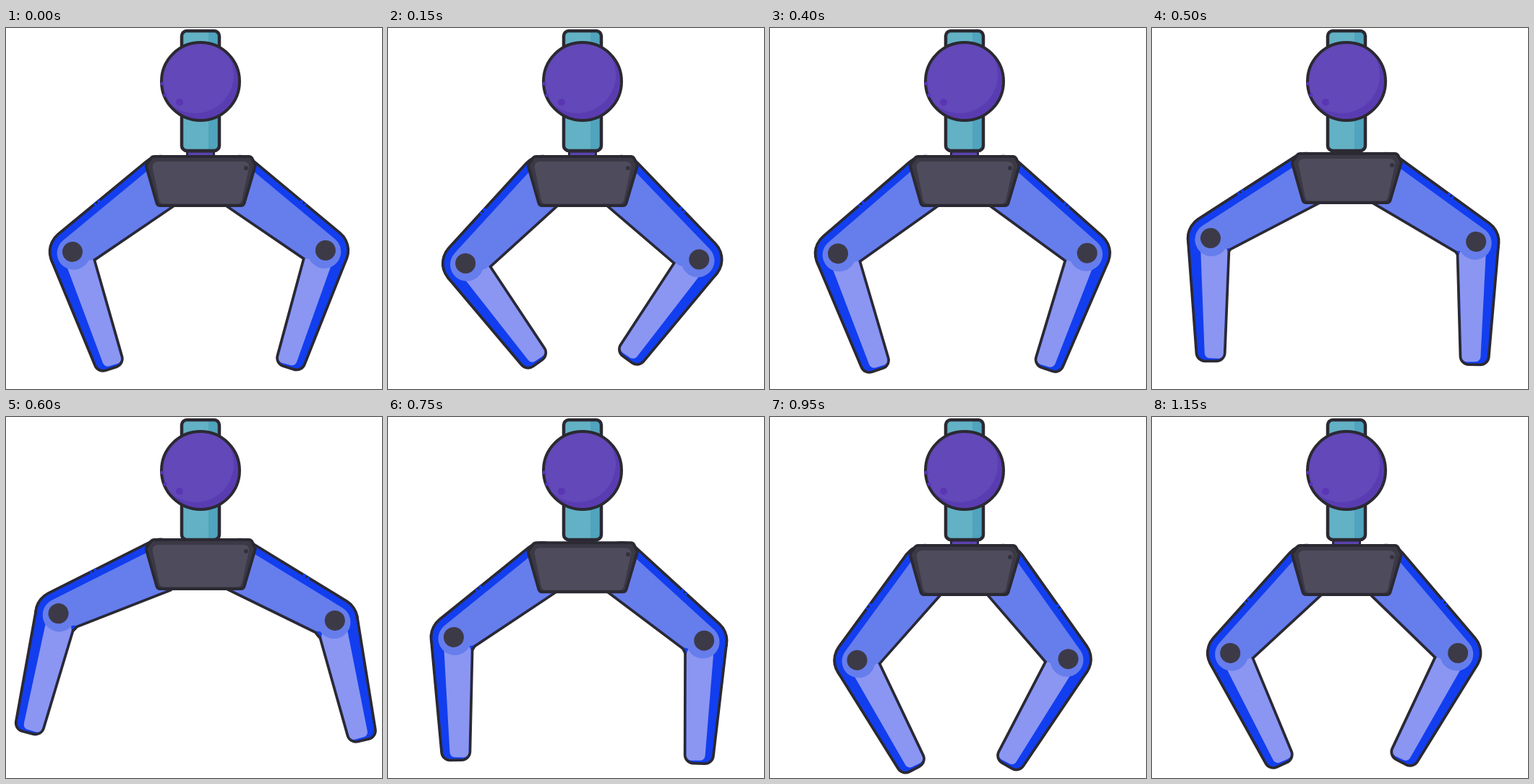
Animation, 520 px wide and 500 px high, one loop 1200 ms. Source, as an HTML page with a canvas:

```html
<!DOCTYPE html>
<html lang="en">
<head>
<meta charset="utf-8">
<title>Robot claw</title>
<style>
html, body { margin: 0; width: 100%; height: 100%; overflow: hidden; background: #fff; }
canvas { display: block; }
</style>
</head>
<body>
<canvas id="stage" width="520" height="500"></canvas>
<script>
const ctx = document.getElementById('stage').getContext('2d');
const LOOP = 1200, STEP = 50, RAD = Math.PI / 180;
const INK = '#2b2932', BLUE = '#123eef', ARM = '#667dec', LEG = '#8b96f2', JOINT = '#3d3a47';
const EDGE = 7.5;

// Key poses of the left arm: step, arm angle below horizontal, leg angle from vertical.
const keys = [
  [0, 39.6, 18.2], [6, 47, 33.7], [10, 32.9, 0], [12, 26.7, -14.4],
  [15, 39, 1], [19, 53.8, 27.7], [23, 48.1, 24.8]
];

// Slope at a key; the loop ends with a cut, so the ends are one-sided.
function slope(i, k) {
  const rate = j => (keys[j + 1][k] - keys[j][k]) / (keys[j + 1][0] - keys[j][0]);
  const last = keys.length - 1;
  if (i === 0) return 2 * rate(0) - slope(1, k);
  if (i === last) return 2 * rate(last - 1) - slope(last - 1, k);
  const before = keys[i][0] - keys[i - 1][0], after = keys[i + 1][0] - keys[i][0];
  return (after * rate(i - 1) + before * rate(i)) / (before + after);
}

function angle(k, t) {
  const next = keys.findIndex(key => key[0] > t);
  const i = (next < 0 ? keys.length - 1 : next) - 1;
  const a = keys[i], b = keys[i + 1], h = b[0] - a[0];
  const s = (t - a[0]) / h, r = 1 - s;
  return a[k] * r * r * (1 + 2 * s) + b[k] * s * s * (3 - 2 * s) +
    h * s * r * (slope(i, k) * r - slope(i + 1, k) * s);
}

function poly(points, radius) {
  const p = new Path2D(), n = points.length, [a, b] = [points[n - 1], points[0]];
  p.moveTo((a[0] + b[0]) / 2, (a[1] + b[1]) / 2);
  points.forEach((q, i) => p.arcTo(...q, ...points[(i + 1) % n], radius));
  p.closePath();
  return p;
}

function disc(x, y, r) {
  const p = new Path2D();
  p.arc(x, y, r, 0, 2 * Math.PI);
  return p;
}

function fill(path, color) {
  ctx.fillStyle = color;
  ctx.fill(path);
}

function outline(path, width) {
  ctx.strokeStyle = INK;
  ctx.lineWidth = width;
  ctx.lineJoin = 'round';
  ctx.stroke(path);
}

// Arm along +x from shoulder to elbow, outer side at +y.
function armPath(len, top, capY, capR) {
  const p = new Path2D();
  p.moveTo(5, -39);
  p.lineTo(len - 14, -26);
  p.arc(len, capY, capR, -2, Math.PI / 2);
  p.lineTo(0, top);
  p.arc(0, 0, top, Math.PI / 2, Math.PI);
  p.closePath();
  return p;
}

const legPath = poly([[-12, 22], [0, 29.5], [168.5, 17], [168.5, -17.5], [18, -23.5], [-12, -15]], 10);
const legPanel = poly([[10, 14], [166, 8], [167, -17.5], [18, -23.5], [10, -20]], 7);

function drawArm(len, arm, leg, lift) {
  const c = Math.cos(arm * RAD), s = Math.sin(arm * RAD);
  const upper = armPath(len, 29.5, 0, 29.5);
  const onLeg = draw => {
    ctx.save();
    ctx.translate(len, 0);
    ctx.rotate((arm - leg - 90) * RAD);
    draw();
    ctx.restore();
  };
  ctx.save();
  ctx.transform(-c, s, -s, -c, 214, 209 + lift);
  outline(upper, EDGE);
  onLeg(() => { outline(legPath, EDGE); fill(legPath, BLUE); });
  fill(upper, BLUE);
  ctx.fillRect(84, 29, 4, 4);
  ctx.fillRect(91, 29, 3, 4);
  onLeg(() => fill(legPanel, LEG));
  fill(armPath(len, 20.5, -2.5, 23), ARM);
  fill(disc(len, 0, 14), JOINT);
  ctx.restore();
}

const post = poly([[243, 4], [295, 4], [295, 170], [243, 170]], 7);
const shell = poly([[202, 178], [339, 178], [345, 190], [328.5, 246], [209.5, 246], [193.5, 190]], 5);
const plate = poly([[201, 185], [338, 185], [325, 243.5], [213, 243.5]], 7);
const ball = disc(269, 74, 54);

function drawPost() {
  ctx.fillStyle = INK;
  ctx.fillRect(249, 168, 40, 12);
  ctx.fillStyle = '#5b43b2';
  ctx.fillRect(252, 172.5, 34, 5);
  fill(post, '#63b1c5');
  ctx.save();
  ctx.clip(post);
  ctx.fillStyle = '#50a4bd';
  ctx.fillRect(280, 0, 20, 172);
  ctx.restore();
  outline(post, 4.5);
}

function drawBall() {
  fill(ball, '#5a3cb2');
  ctx.save();
  ctx.clip(ball);
  fill(disc(262, 65, 53), '#6248b8');
  ctx.restore();
  outline(ball, 4);
  fill(disc(240, 103, 5), '#5b36b4');
  fill(disc(216, 77, 2.5), '#5a32c4');
  fill(disc(220, 93, 2.5), '#5a32c4');
}

function drawShell(lift) {
  ctx.save();
  ctx.translate(0, lift);
  fill(shell, '#3b3945');
  outline(shell, 4);
  fill(plate, '#4e4b5c');
  fill(disc(332, 194, 3), '#33313c');
  ctx.restore();
}

function frame(now) {
  const t = Math.floor(now % LOOP / STEP);
  const arm = angle(1, t), leg = angle(2, t);
  const lift = Math.min(0, 0.28 * leg - 4);
  ctx.fillStyle = '#fff';
  ctx.fillRect(0, 0, 520, 500);
  drawPost();
  drawBall();
  drawArm(158.4, arm, leg, lift);
  // The right arm opens less and drifts slowly against the left.
  ctx.save();
  ctx.transform(-1, 0, 0, 1, 537, 0);
  drawArm(154.7, arm + 2.2 - 0.11 * leg + 0.09 * t, leg - 0.8 + 0.15 * t, lift);
  ctx.restore();
  drawShell(lift);
}

let start;
function tick(now) {
  if (start === undefined) start = now;
  frame(Math.max(0, now - start));
  requestAnimationFrame(tick);
}
frame(0);
requestAnimationFrame(tick);
</script>
</body>
</html>
```
